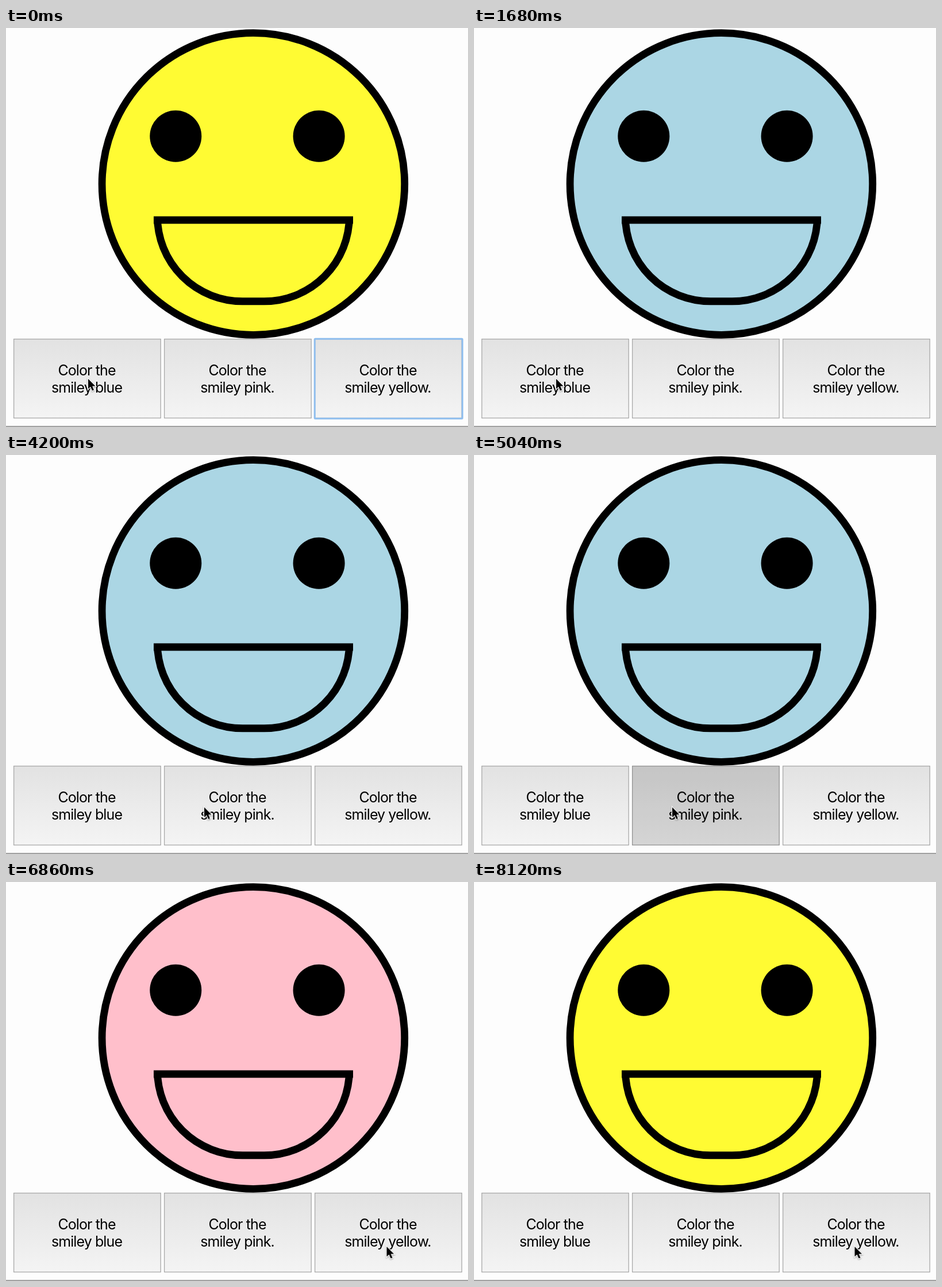
Animation of 804x696 px, one loop 8140 ms. Source, as an HTML page:

```html
<!DOCTYPE html>
<html lang="en">
<head>
<meta charset="utf-8">
<title>Color the smiley</title>
<style>
  html, body { margin: 0; width: 100%; height: 100%; overflow: hidden; background: #fdfdfd; }
  svg { display: block; width: 804px; height: 696px; }
  text { font: 25px Inter, "Liberation Sans", sans-serif; letter-spacing: -.036em; text-anchor: middle; }

  .face, .ring, .shade, .cursor { animation: 8140ms step-end infinite; }
  .face { stroke: #000; stroke-width: 12.8; animation-name: paint; }
  .mouth { fill: none; stroke: #000; stroke-width: 12.9; }
  .box { fill: url(#metal); stroke: #a9a9a9; stroke-width: 1.3; }
  .ring { fill: none; stroke: #8fbeee; stroke-width: 3; animation-name: blur; }
  .shade { opacity: 0; }
  .blue .shade { animation-name: press-blue; }
  .pink .shade { animation-name: press-pink; }
  .yellow .shade { animation-name: press-yellow; }
  .cursor { animation-name: move; filter: drop-shadow(0 1px 1px rgba(0, 0, 0, .35)); }

  @keyframes paint {
    0% { fill: #fffb33; }
    12.04% { fill: #abd6e4; }
    63.39% { fill: #ffbfcb; }
    96.81%, 100% { fill: #fffb33; }
  }
  @keyframes blur {
    0% { opacity: 1; }
    9.34%, 100% { opacity: 0; }
  }
  @keyframes press-blue {
    0% { opacity: 0; }
    9.34% { opacity: .13; }
    12.04%, 100% { opacity: 0; }
  }
  @keyframes press-pink {
    0% { opacity: 0; }
    60.93% { opacity: .13; }
    63.39%, 100% { opacity: 0; }
  }
  @keyframes press-yellow {
    0% { opacity: 0; }
    94.59% { opacity: .13; }
    96.81%, 100% { opacity: 0; }
  }
  @keyframes move {
    0% { transform: translate(143px, 612px); }
    31.2% { transform: translate(143px, 612px); animation-timing-function: ease-in-out; }
    39.8% { transform: translate(345px, 614.5px); }
    73.7% { transform: translate(345px, 614.5px); animation-timing-function: ease-in-out; }
    81.7%, 100% { transform: translate(662.5px, 636px); }
  }
</style>
</head>
<body>
<svg viewBox="0 0 804 696">
  <defs>
    <linearGradient id="metal" x2="0" y2="1">
      <stop stop-color="#e2e2e2"/>
      <stop offset="1" stop-color="#f4f4f4"/>
    </linearGradient>
  </defs>

  <circle class="face" cx="430.4" cy="272" r="263.3"/>
  <circle cx="295.3" cy="188.7" r="45"/>
  <circle cx="544.6" cy="188.7" r="45"/>
  <path class="mouth" d="M257 335H604M263.4 328.5A148.3 148.3 0 0 0 411.7 476.8H449.2A148.3 148.3 0 0 0 597.5 328.5"/>

  <g class="blue" transform="translate(13 542)">
    <rect class="box" x=".6" y=".6" width="255.6" height="137.8"/>
    <rect class="shade" width="257" height="139"/>
    <text x="127.5" y="64">Color the</text>
    <text x="127.5" y="94">smiley blue</text>
  </g>
  <g class="pink" transform="translate(275 542)">
    <rect class="box" x=".6" y=".6" width="255.6" height="137.8"/>
    <rect class="shade" width="257" height="139"/>
    <text x="127.5" y="64">Color the</text>
    <text x="127.5" y="94">smiley pink.</text>
  </g>
  <g class="yellow" transform="translate(537 542)">
    <rect class="box" x=".6" y=".6" width="255.6" height="137.8"/>
    <rect class="shade" width="257" height="139"/>
    <rect class="ring" x=".2" y=".2" width="257" height="139" rx="1"/>
    <text x="127.5" y="64">Color the</text>
    <text x="127.5" y="94">smiley yellow.</text>
  </g>

  <path d="M0 695H804" stroke="#858585" stroke-width="1.4"/>

  <g class="cursor">
    <path d="M0 0V17.6L4.1 13.8L7 20.6L10 19.4L7.2 12.7H12.6Z" stroke="#fff" stroke-width="2.4" paint-order="stroke"/>
  </g>
</svg>
</body>
</html>
```
